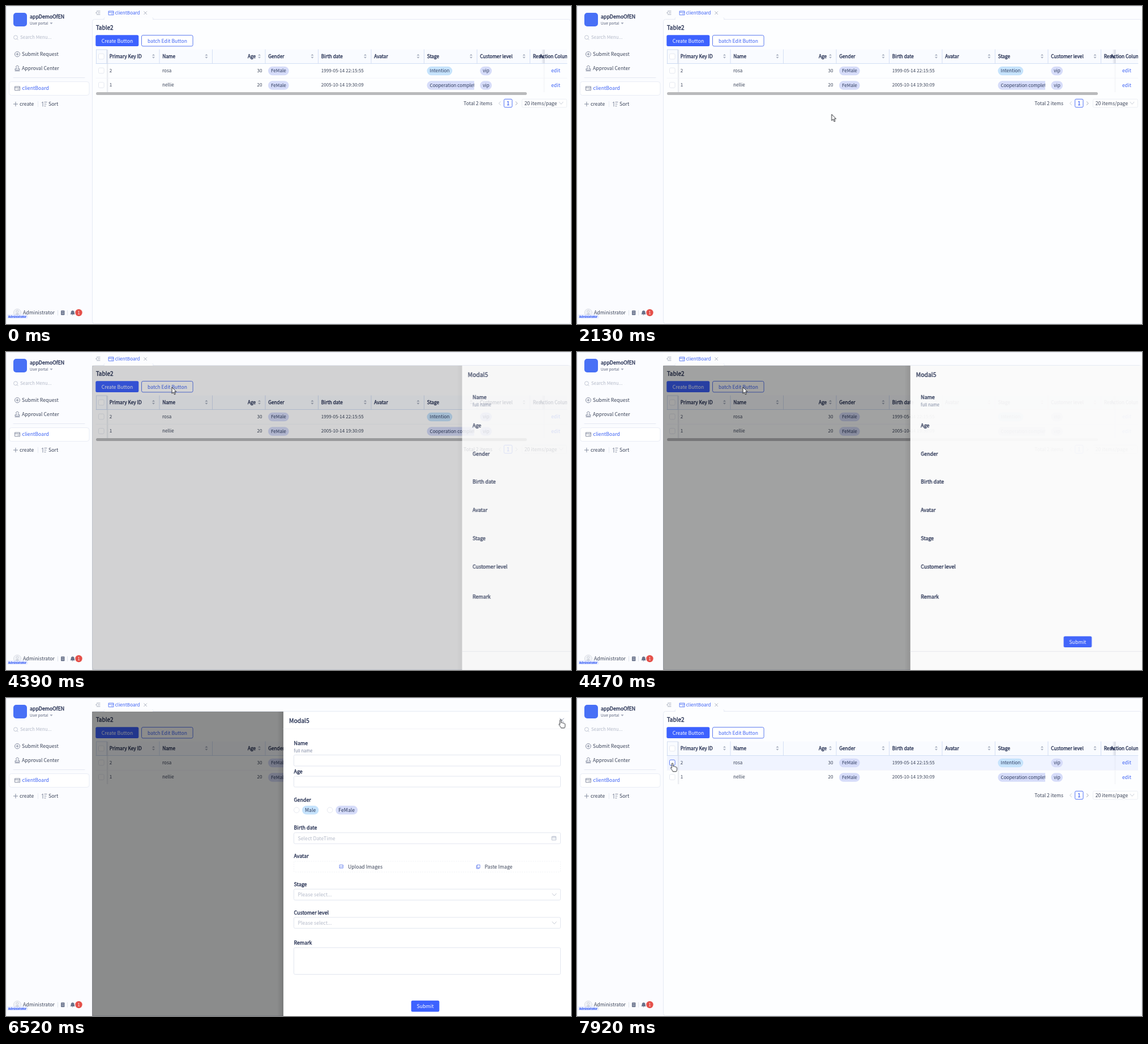
An HTML page that plays this animation: 998 by 561 pixels, repeating every 8 s.

```html
<!DOCTYPE html>
<html lang="en">
<head>
<meta charset="utf-8">
<title>Client board</title>
<style>
  html, body { margin: 0; width: 100%; height: 100%; overflow: hidden; background: #fcfdff; }
  svg { display: block; width: 100vw; height: 100vh; }
  text { font-family: "Noto Sans CJK SC", "Noto Sans CJK JP", "Noto Sans CJK", "Noto Sans", sans-serif; white-space: pre; }
  .strong { stroke: currentColor; stroke-width: .3; }
  .line { fill: none; stroke-width: .8; stroke-linecap: round; stroke-linejoin: round; }
  .anim { animation-duration: 8s; animation-iteration-count: infinite; animation-timing-function: ease; }
  .toggle { animation-timing-function: step-end; }
  #cursor { animation-name: travel; animation-timing-function: linear; }
  #drawer { animation-name: slide; }
  .fade { animation-name: fade; }
  @keyframes slide {
    0%, 54%, 85.29%, 100% { transform: translateX(508px); opacity: .7; }
    57.75%, 81.54% { transform: none; opacity: 1; }
  }
  @keyframes fade {
    0%, 54%, 85.29%, 100% { opacity: 0; }
    57.75%, 81.54% { opacity: 1; }
  }
</style>
</head>
<body>
<script>
const LOOP = 8000;
const INK = '#1f2a4d', BODY = '#3a4358', MUTED = '#b4bac9', GREY = '#8a93a8', BLUE = '#3d62f5', EDGE = '#e2e6ef';
const LILAC = '#d6dcf9', SKY = '#c6e3fc';
const pct = ms => (ms / LOOP * 100).toFixed(3) + '%';

// Drawing helpers; text is placed by the middle of its capitals.
const text = (x, y, s, size = 8.75, fill = BODY, more = '') =>
  `<text x="${x}" y="${y + size * .36}" font-size="${size}" fill="${fill}" ${more}>${s}</text>`;
const strong = (x, y, s, size = 8.88, fill = INK, more = '') =>
  text(x, y, s, size, fill, `class="strong" color="${fill}" ${more}`);
const centred = (x, y, s, size, fill) => text(x, y, s, size, fill, 'text-anchor="middle"');
const rect = (x, y, w, h, fill, rx = 0, stroke = 'none', more = '') =>
  `<rect x="${x}" y="${y}" width="${w}" height="${h}" rx="${rx}" fill="${fill}" stroke="${stroke}" ${more}/>`;
const stroke = (d, color = GREY, more = '') => `<path class="line" d="${d}" stroke="${color}" ${more}/>`;
const shape = (d, fill) => `<path d="${d}" fill="${fill}"/>`;
const ring = (x, y, r, color, fill = 'none') =>
  `<circle cx="${x}" cy="${y}" r="${r}" fill="${fill}" stroke="${color}" stroke-width=".8"/>`;
const pill = (x, y, w, s, fill, size = 8.125) =>
  rect(x, y - 7.8, w, 15.6, fill, 7.8) + text(x + 5, y, s, size, '#2d3a5e');
const cross = (x, y, r, color) => stroke(`M${x - r} ${y - r}l${2 * r} ${2 * r}m0 ${-2 * r}l${-2 * r} ${2 * r}`, color);
const chevron = (x, y) => stroke(`M${x - 3.5} ${y - 2}l3.5 4 3.5-4`, '#b8becb');
const boardIcon = (x, y, color) => stroke(`M${x} ${y}h8.5v6.8h-8.5zM${x} ${y + 2.2}h8.5M${x + 5} ${y + 4.8}h1.5`, color);
const field = (y, h) => rect(508.5, y, 471, h, '#fff', 2, EDGE);

// Timed visibility: spans are [on, off] pairs in milliseconds.
let css = '';
function toggle(name, spans, body) {
  const states = new Map([[0, 'hidden']]);
  for (const [on, off] of spans) { states.set(off, 'hidden'); states.set(on, 'visible'); }
  const frames = [...states].map(([ms, v]) => `${pct(ms)}{visibility:${v}}`).join('');
  css += `@keyframes ${name}{${frames}}`;
  return `<g class="anim toggle" style="animation-name:${name}">${body}</g>`;
}

function sidebar() {
  return rect(0, 0, 152, 561, '#fbfcff') + stroke('M0 .5H998M.5 0V561', '#e1e5f1')
    + rect(13, 12, 24, 24, '#4870f6', 5)
    + strong(42, 18.5, 'appDemoOfEN', 8.8) + text(42, 30.5, 'User portal', 6.25, '#525b75')
    + shape('M77.5 29.2h5l-2.5 3z', '#a0a7b8')
    + ring(17, 55.3, 3.4, MUTED) + stroke('M19.5 58l1.7 1.7', MUTED) + text(25, 55.5, 'Search Menu...', 8.125, MUTED)
    + ring(20, 85, 4.5, '#69728a') + stroke('M17.8 85h4.4M20 82.8v4.4', '#69728a') + text(28, 85, 'Submit Request')
    + stroke('M16 112.5v-1.8h2.6v-1.4a2.3 2.3 0 1 1 2.8 0v1.4H24v1.8zM16 114.5h8', '#69728a') + text(28, 110.3, 'Approval Center')
    + stroke('M13 126.5H139', '#dfe4ef')
    + rect(5.5, 133.5, 141.5, 24, '#fff', 4, '#e9edf6') + boardIcon(16, 142, '#69728a') + text(28.5, 145.3, 'clientBoard', 8.75, BLUE)
    + stroke('M13.3 173h7.4M17 169.3v7.4', '#69728a') + text(24, 173.2, 'create')
    + stroke('M56.5 168.5v9', EDGE) + stroke('M65 177v-8l-1.6 1.8M68 169.5h4M68 173h3M68 176.5h2', '#69728a') + text(75, 173.2, 'Sort')
    + ring(20, 541, 6.6, '#d3d7e0', '#f1f3f7') + shape('M15.5 545q4.5-6 9 0-4.5 4-9 0z', '#c5cad5') + ring(20, 538.8, 2, '#c5cad5')
    + text(30, 541.3, 'Administrator') + stroke('M91.5 537v8.5M108.5 537v8.5', '#d9dde7')
    + rect(97, 537.2, 6.5, 8, '#69728a', 1) + stroke('M98.5 539.8h3.5M98.5 542.6h3.5', '#d9dde7')
    + shape('M113.5 544q1.2-1 1.2-3.5 0-3 3-3.3 3 .3 3 3.3 0 2.5 1.2 3.5zM116.5 544.5h2.4l-1.2 1.2z', '#69728a')
    + `<circle cx="128.5" cy="541" r="6.2" fill="#e5504a"/>` + centred(128.5, 541, '1', 7.5, '#fff')
    + rect(2, 544.3, 36.5, 6.8, '#e6ebff', 1) + strong(4, 547.7, 'Administrator', 5, BLUE);
}

function topBar() {
  return rect(152.5, 23.5, 845, 537, '#fdfeff', 4, '#e6eaf4')
    + rect(174, 22, 85, 3, '#fdfeff') + stroke('M171 23.5q3 0 3-3M262 23.5q-3 0-3-3', '#e6eaf4')
    + stroke('M160.5 9h5.5M162.5 12h3.5M160.5 15h5.5M160.5 10.7l-1.8 1.3 1.8 1.3', GREY)
    + boardIcon(181.5, 9, BLUE) + text(192.7, 11.7, 'clientBoard', 8.125, BLUE) + cross(246.2, 12.2, 2.5, '#9aa1b2');
}

function sorter(x) {
  return shape(`M${x - 2.5} 87.6h5l-2.5-2.8zM${x - 2.5} 89.8h5l-2.5 2.8z`, '#a8afbf');
}

const checkbox = y => rect(163.5, y - 4.8, 9.6, 9.6, '#fff', 2, '#e0e4ec', 'stroke-width=".8"');

function row(y, id, name, age, born, stage) {
  return checkbox(y) + text(182.7, y, id, 8.125) + text(276, y, name, 8.125)
    + text(452.5, y, age, 8.125, BODY, 'text-anchor="end"') + pill(463, y + .5, 36.7, 'FeMale', LILAC)
    + text(556.7, y, born, 8.125) + stage + pill(837.3, y + .5, 20.8, 'vip', LILAC)
    + text(963, y + .3, 'edit', 8.75, BLUE);
}

function table() {
  const columns = ['Primary Key ID', 'Name', '', 'Gender', 'Birth date', 'Avatar', 'Stage', 'Customer level', 'Remark'];
  const left = i => 177.5 + 93.5 * i;
  const head = columns.map((s, i) =>
    strong(left(i) + 5.2, 88.6, s, 8.3)
    + (i ? stroke(`M${left(i)} 77V101`, '#cbd9f1') : '')
    + (i < 8 ? sorter(left(i) + 83) : '')).join('');
  const hover = y => rect(159, y, 832, 25, '#f0f4ff');
  const row1 = toggle('rowOne', [[1110, 1410], [1519, 1562], [2478, 2533], [2684, 2754], [6822, 7420], [7737, 8000]], hover(102));
  const row2 = toggle('rowTwo', [[1562, 1605], [2422, 2478], [2754, 2824], [7420, 7737]], hover(127.5));
  return strong(158.7, 38.7, 'Table2', 10)
    + rect(158.3, 51.3, 76, 19.8, '#3d62ff', 2.5) + centred(196.4, 61.5, 'Create Button', 8.65, '#fff')
    + rect(239.5, 51.6, 90.6, 19.3, '#fff', 2.5, '#4a6bef', 'stroke-width=".9"') + centred(285, 61.5, 'batch Edit Button', 8.6, BLUE)
    + rect(159, 76.5, 832, 25, '#f9fbff') + row1 + row2 + head
    + rect(159.5, 77, 18.5, 24.5, 'none', 0, '#d3def2') + checkbox(89)
    + rect(178, 77, 3.5, 75, 'url(#edgeLeft)')
    + rect(951, 77, 40, 24, '#f9fbff') + rect(945.5, 77, 6, 24, 'url(#edgeRight)') + rect(948, 102, 3.5, 50, 'url(#edgeRight)', 0, 'none', 'opacity=".25"')
    + strong(427, 88.6, 'Age', 8.3) + `<g clip-path="url(#tableClip)">${strong(942.5, 88.6, 'Action Column', 8.3)}</g>`
    + stroke('M159 101.5H991', '#c8d8f2') + stroke('M159 127.3H991', '#f1f3f9')
    + row(114, '2', 'rosa', '30', '1999-05-14 22:15:55', pill(743.5, 114.5, 44.8, 'Intention', SKY))
    + row(139.5, '1', 'nellie', '20', '2005-10-14 19:30:09',
        `<g clip-path="url(#stageClip)">${pill(743.5, 140, 96, 'Cooperation completed', LILAC)}</g>`)
    + toggle('checkHover', [[7850, 8000]], rect(163.5, 109.2, 9.6, 9.6, '#fff', 2, BLUE, 'stroke-width=".8"'))
    + toggle('scrollbar', [[0, 4590]], rect(159, 152, 761, 5, '#b9babc', 2.5))
    + text(808.3, 171.8, 'Total 2 items', 8.6) + stroke('M873.5 168.8l-3 2.9 3 2.9', '#b8becb') + stroke('M900.3 168.8l3 2.9-3 2.9', '#8d95a6')
    + rect(879.7, 164.3, 14.3, 14.4, '#fff', 2, BLUE, 'stroke-width=".9"') + strong(884.5, 171.7, '1', 8.75, BLUE)
    + rect(911.5, 164.3, 79, 14.6, '#fff', 2, '#e8ebf1', 'stroke-width=".8"') + text(915.7, 171.8, '20 items/page') + chevron(980.5, 171.3);
}

function submit(x, y) {
  return rect(x, y, 49.7, 19.7, '#3d62ff', 2.5) + centred(x + 24.8, y + 10, 'Submit', 8.9, '#fff');
}

function drawer() {
  const labels = [['Name', 79.5], ['Age', 129.5], ['Gender', 179.7], ['Birth date', 229.2], ['Avatar', 278.8],
    ['Stage', 328.7], ['Customer level', 378.7], ['Remark', 432]];
  const select = y => field(y, 19.3) + text(515.5, y + 10, 'Please select...', 8.75, MUTED) + chevron(968.5, y + 9.8);
  const form = stroke('M490 54.5H998', '#eff1f5')
    + field(100.5, 19.5) + field(138, 19)
    + ring(513.3, 197.7, 4.8, '#dfe3eb', '#fff') + pill(523, 197.7, 29.3, 'Male', SKY, 8.75)
    + ring(572.2, 197.7, 4.8, '#dfe3eb', '#fff') + pill(582.3, 197.7, 38.8, 'FeMale', LILAC, 8.75)
    + field(237.7, 19.3) + text(515.5, 247.7, 'Select DateTime', 8.75, MUTED)
    + stroke('M964.5 244.5h7v6h-7zM964.5 246.8h7M966.5 243.5v1.5M969.5 243.5v1.5', '#a9b1c4')
    + rect(508.5, 288, 471, 19, 'none', 2, '#f0f2f6', 'stroke-dasharray="2 2"')
    + stroke('M589.5 294.5h5.8v5.6h-5.8zM589.5 299l2-2 1.5 1.5 2.3-2.5', '#5c78ee') + text(604, 297.8, 'Upload Images')
    + stroke('M832.5 294.3h4.6v5.4h-4.6zM832.5 295.8h-1.4v5.2h4.4v-1.3', '#5c78ee') + text(845.5, 297.8, 'Paste Image')
    + select(337.2) + select(387) + field(440.5, 47) + submit(715.7, 533.8);
  const draft = stroke('M490 528.3H998', '#e6e8ee') + submit(760.8, 501.4);
  return `<g id="drawer" class="anim">`
    + `<g class="anim fade">${rect(479, 24, 11, 537, 'url(#drawerShade)')}</g>`
    + rect(490, 24, 508, 537, '#fff') + strong(500, 40, 'Modal5', 10.4) + cross(981.8, 39.3, 3.5, '#7c86a0')
    + toggle('draft', [[0, 4550], [7200, 8000]], draft) + toggle('form', [[4550, 7200]], form)
    + labels.map(([s, y]) => strong(508.5, y, s)).join('') + text(508.5, 93.2, 'full name', 7.5, '#7f89a3') + '</g>';
}

function cursor() {
  const stops = [[0, 655, 5], [450, 655, 5], [650, 693, 78], [800, 478, 79], [950, 297, 77], [1210, 400, 118], [1290, 400, 118],
    [1500, 516, 91], [1800, 470, 266], [2090, 449.5, 191], [2150, 449.5, 191], [2300, 450, 207], [2600, 522, 72], [2930, 430, 190],
    [2970, 430, 197], [3100, 400, 90], [3400, 320, 76], [3590, 292.7, 62], [4950, 292.7, 62], [5150, 450, 110], [5450, 760, 123],
    [5740, 939.5, 40], [5790, 939.5, 40], [6120, 981, 38], [6520, 980, 38], [6640, 930.5, 48.5], [6900, 700, 120],
    [7320, 300, 122], [7600, 153, 136], [7910, 168.5, 115], [8000, 168.5, 115]];
  css += `@keyframes travel{${stops.map(([ms, x, y]) => `${pct(ms)}{transform:translate(${x}px,${y}px)}`).join('')}}`;
  const glyph = d => `<path d="${d}" fill="#fff" stroke="#16181d" stroke-width=".9" stroke-linejoin="round"/>`;
  const arrow = glyph('M.3 0V11.2L2.9 8.8 4.8 13 6.5 12.2 4.7 8.1H8.1Z');
  const hand = glyph('M-1.2 8.5V1.2a1.2 1.2 0 0 1 2.4 0V5.4q2.2-.6 2.6.8 2-.4 2.4.8 1.8-.2 1.8 1.4v3q0 1.6-1.2 3.4H1q-1.2-2.4-3.6-5.4-.8-1.4.4-1.8Z');
  return `<g id="cursor" class="anim">`
    + toggle('arrow', [[450, 3480], [4320, 6050], [6523, 7780]], arrow)
    + toggle('hand', [[3480, 4320], [6050, 6523], [7780, 8000]], hand) + '</g>';
}

const fadeTo = (id, from, to) => `<linearGradient id="${id}"><stop stop-color="#3a4668" stop-opacity="${from}"/>`
  + `<stop offset="1" stop-color="#3a4668" stop-opacity="${to}"/></linearGradient>`;
const defs = `<defs>${fadeTo('edgeLeft', .13, 0)}${fadeTo('edgeRight', 0, .2)}`
  + `<linearGradient id="drawerShade"><stop stop-opacity="0"/><stop offset="1" stop-opacity=".12"/></linearGradient>`
  + `<clipPath id="tableClip">${rect(159, 76, 832, 90, '#000')}</clipPath>`
  + `<clipPath id="stageClip">${rect(743, 128, 84, 24, '#000')}</clipPath></defs>`;

const scene = defs + rect(0, 0, 998, 561, '#fcfdff') + sidebar() + topBar() + table()
  + `<g class="anim fade">${rect(152, 24, 846, 537, 'rgba(0,0,0,.45)')}</g>` + drawer() + cursor();
document.head.insertAdjacentHTML('beforeend', `<style>${css}</style>`);
document.body.insertAdjacentHTML('beforeend', `<svg viewBox="0 0 998 561" preserveAspectRatio="none">${scene}</svg>`);
</script>
</body>
</html>
```
